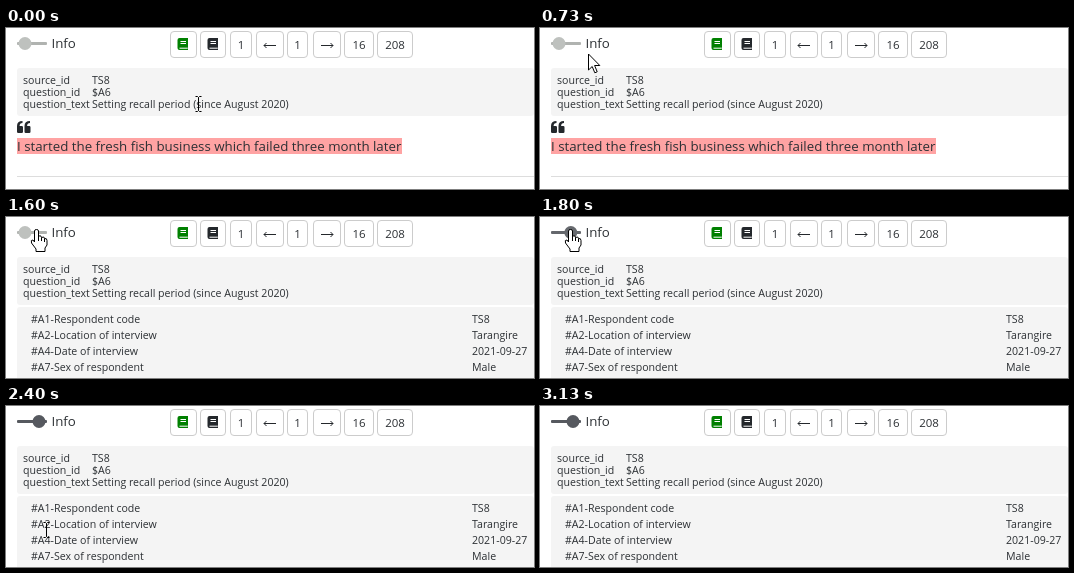
An HTML page for the animation above (4.19 s loop, 528 px wide and 161 px high).

```html
<!DOCTYPE html>
<html lang="en">
<head>
<meta charset="utf-8">
<title>Info toggle</title>
<style>
html, body { margin: 0; width: 100%; height: 100%; overflow: hidden; background: #fff; }
svg { display: block; }
text { font: 10.6px "Open Sans", "Noto Sans", sans-serif; fill: #2c3034; white-space: pre; }
.big { font-size: 13.3px; }
.num { font-size: 11.5px; text-anchor: middle; }
.btn { fill: #fff; stroke: #ccc; }
.line { fill: none; stroke: #24282c; }
.cursor { fill: #fff; stroke: #000; stroke-linejoin: round; }
</style>
</head>
<body>
<svg width="528" height="161" viewBox="0 0 528 161">
  <defs>
    <g id="book">
      <path d="M2 0H10.5V9.5H10V11H10.5V12H2Q0 12 0 10V2Q0 0 2 0Z"/>
      <path d="M3 3.5H8.5M3 5.5H8.5M2 10.2H9.5" stroke="#fff" fill="none"/>
    </g>
    <path id="quote" d="M5.5 0V2Q2.6 2 2.6 5H4.8Q6 5 6 6.2V10.8Q6 12 4.8 12H1.2Q0 12 0 10.8V5Q0 0 5.5 0Z"/>
  </defs>
  <rect id="track" x="11" y="14" width="30" height="3" rx="1"/>
  <circle id="knob" cy="15.500" r="6.500"/>
  <text class="big" x="45.500" y="20">Info</text>
  <g id="buttons"></g>
  <use href="#book" x="171.500" y="10" fill="#008000"/>
  <use href="#book" x="201.500" y="10" fill="#24282c"/>
  <path class="line" d="M258 17.500H270M260.500 15L258 17.500L260.500 20M315 17.500H327M324.500 15L327 17.500L324.500 20"/>
  <rect x="11" y="40" width="517" height="48" rx="3" fill="#f4f4f4"/>
  <g id="meta"></g>
  <g id="closed">
    <use href="#quote" x="11" y="93" fill="#24282c"/>
    <use href="#quote" x="18.500" y="93" fill="#24282c"/>
    <rect x="11" y="110" width="385" height="16" fill="#ffa3a3"/>
    <text class="big" x="11" y="123">I started the fresh fish business which failed three month later</text>
    <path d="M11 148.500H528" stroke="#ddd"/>
  </g>
  <g id="open">
    <rect x="11" y="90" width="517" height="75" rx="3" fill="#f4f4f4"/>
  </g>
  <g class="cursor">
    <path id="beam" fill="none" d="M-3 -7.500H-1L0 -6.500L1 -7.500H3M0 -6.500V6.500M-3 7.500H-1L0 6.500L1 7.500H3"/>
    <path id="arrow" d="M0 0V16L3.700 12.500L6.300 18.800L8.700 17.800L6.100 11.500H11.300Z"/>
    <path id="hand" d="M-2 2Q-2 .5 0 .5T2 2V7Q5 6 5 8.500Q8 7 8 9.500Q10.500 9 10.500 11.500V16L8.500 19V22.500H-.5V20L-5 14Q-6 10.500 -3.500 11L-2 13ZM2 7V12M5 8.500V12M8 9.500V13"/>
  </g>
</svg>
<script>
const $ = id => document.getElementById(id);

function add(parent, tag, attrs, content = "") {
  const el = document.createElementNS("http://www.w3.org/2000/svg", tag);
  for (const key in attrs) el.setAttribute(key, attrs[key]);
  el.textContent = content;
  parent.append(el);
}

function table(parent, rows, x1, x2, top, gap) {
  rows.forEach((row, i) => [x1, x2].forEach((x, j) =>
    add(parent, "text", { x, y: top + i * gap }, row[j])));
}

// left edge, width, label
[[164, 26], [194, 25], [224, 21, "1"], [250, 27], [281, 20, "1"],
 [307, 27], [338, 29, "16"], [371, 35, "208"]].forEach(([x, width, label]) => {
  add($("buttons"), "rect", { class: "btn", x: x + .5, y: 3.5, width, height: 26, rx: 3.5 });
  if (label) add($("buttons"), "text", { class: "num", x: x + .5 + width / 2, y: 21 }, label);
});

table($("meta"), [
  ["source_id", "TS8"], ["question_id", "$A6"],
  ["question_text", "Setting recall period (since August 2020)"]
], 17, 86, 56, 12);
table($("open"), [
  ["#A1-Respondent code", "TS8"], ["#A2-Location of interview", "Tarangire"],
  ["#A4-Date of interview", "2021-09-27"], ["#A7-Sex of respondent", "Male"]
], 25, 466, 106, 16);

const LOOP = 4190, STEP = 1000 / 15;
// pointer path: step, x, y
const path = [
  [0, 192, 76], [1, 184, 73], [3, 118, 54], [5, 77, 45], [6, 71, 41], [8, 69, 44],
  [9, 66, 42], [11, 48, 26], [13, 34, 14], [15, 29, 13], [16, 30, 12], [32, 30, 12],
  [33, 32, 16], [34, 38, 45], [36, 40, 124], [38, 42, 153], [40, 42, 147],
  [43, 42, 150], [47, 42, 172]
];

function pointer(step) {
  const i = path.findIndex(p => p[0] > step);
  if (i < 0) return path.at(-1).slice(1);
  const a = path[i - 1], b = path[i], k = (step - a[0]) / (b[0] - a[0]);
  return [1, 2].map(j => Math.round(a[j] + (b[j] - a[j]) * k));
}

const shapeAt = step =>
  step < 4 || step >= 36 ? "beam" : step >= 12 && step < 34 ? "hand" : "arrow";
const show = (id, on) => $(id).setAttribute("display", on ? "inline" : "none");

function draw(now) {
  const step = Math.floor((now % LOOP + 4) / STEP);
  const k = Math.max(0, Math.min(1, (step - 24) / 4));
  const ease = k * k * (3 - 2 * k);
  const gray = (from, to) => {
    const v = Math.round(from + (to - from) * ease);
    return `rgb(${v},${v + 3},${v + 9 * ease})`;
  };
  $("knob").setAttribute("cx", 19 + 14 * ease);
  $("knob").setAttribute("fill", gray(190, 86));
  $("track").setAttribute("fill", gray(176, 86));
  show("closed", step < 24);
  show("open", step >= 24);

  const [x, y] = pointer(step), shape = shapeAt(step);
  for (const id of ["beam", "arrow", "hand"]) show(id, id === shape);
  $(shape).setAttribute("transform", `translate(${x + .5} ${y})`);
}

const start = performance.now();
function tick() {
  draw(performance.now() - start);
  requestAnimationFrame(tick);
}
tick();
</script>
</body>
</html>
```
